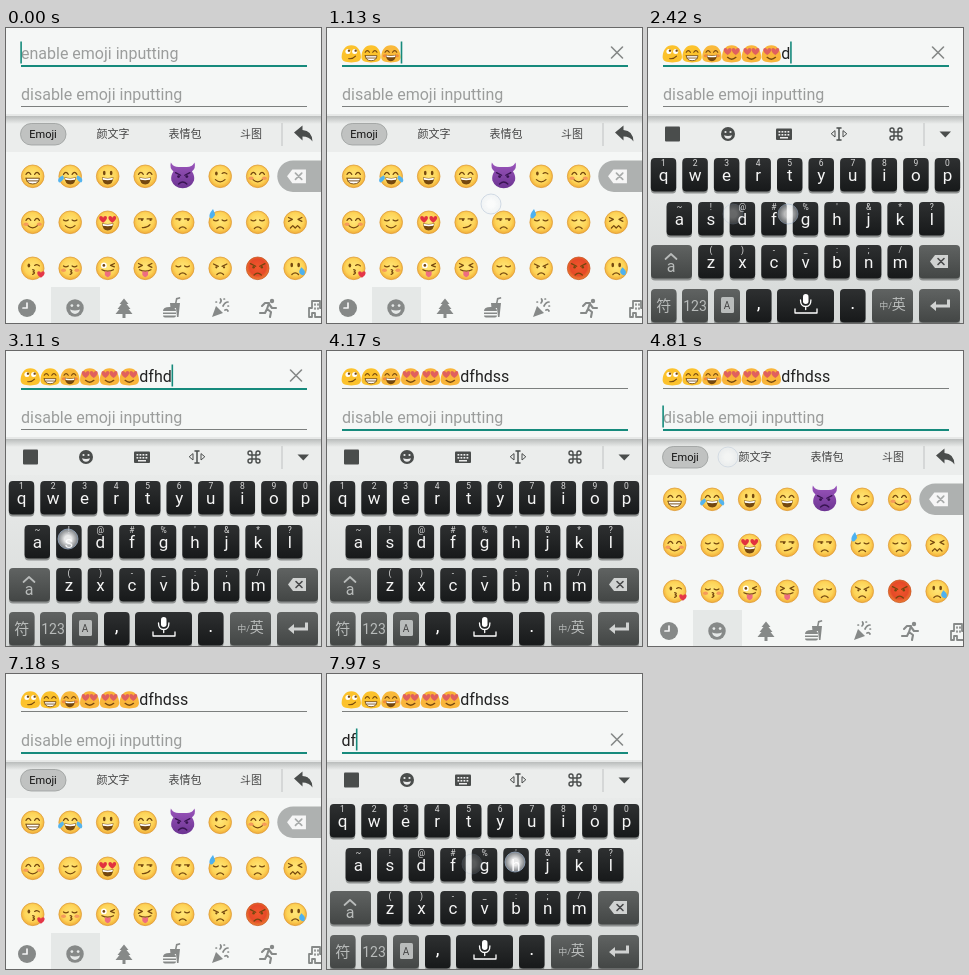
An HTML page that plays this animation: 315x295 px, repeating every 8 s.

```html
<!DOCTYPE html>
<html lang="en">
<head>
<meta charset="utf-8">
<title>Emoji input</title>
<style>
html, body { margin: 0; width: 100%; height: 100%; overflow: hidden; background: #f5f7f6; }
svg { display: block; width: 315px; height: 295px; }
text { font-family: Roboto, "Noto Sans CJK SC", "Noto Sans CJK", sans-serif; }
.field { font-size: 16px; fill: #222; }
.hint { font-size: 16px; fill: #9b9d9c; }
.mid { text-anchor: middle; }
</style>
</head>
<body>
<svg id="stage" viewBox="0 0 315 295" xmlns="http://www.w3.org/2000/svg"></svg>
<script>
const LOOP = 8000, TEAL = '#168a7c', BROWN = '#74480f', ICON = '#4a4d4c', TAB = '#868988';

// Shape helpers
const line = (d, c = BROWN, w = 1.3) =>
  `<path d="${d}" fill="none" stroke="${c}" stroke-width="${w}" stroke-linecap="round" stroke-linejoin="round"/>`;
const fill = (d, c) => `<path d="${d}" fill="${c}"/>`;
const oval = (x, y, rx, ry = rx, c = BROWN) => `<ellipse cx="${x}" cy="${y}" rx="${rx}" ry="${ry}" fill="${c}"/>`;
const rect = (x, y, w, h, c, r = 0, more = '') =>
  `<rect x="${x}" y="${y}" width="${w}" height="${h}" rx="${r}" fill="${c}" ${more}/>`;
const at = (x, y, s, k = 1) => `<g transform="translate(${x} ${y}) scale(${k})">${s}</g>`;
const word = (x, y, s, size, c) => `<text class="mid" x="${x}" y="${y}" font-size="${size}" fill="${c}">${s}</text>`;
const stops = list => list.map(([o, c]) => `<stop offset="${o}" stop-color="${c}"/>`).join('');
const gradient = (id, a, b) => `<linearGradient id="${id}" x2="0" y2="1">${stops([[0, a], [1, b]])}</linearGradient>`;
const glow = (id, a, b, c) => `<radialGradient id="${id}" cy=".45" r=".56">${stops([[0, a], [.65, b], [1, c]])}</radialGradient>`;

// Face parts, drawn around 0,0 with a radius of 11
const heart = 'M0 4C-6 0-5-4-2.5-4Q-.5-4 0-2Q.5-4 2.5-4C5-4 6 0 0 4';
const hearts = (c, k) => at(-4.800, -3, fill(heart, c), k) + at(4.800, -3, fill(heart, c), k);
const tears = fill('M-7-1q-6 3-4.500 6t5.500-3zM7-1q6 3 4.500 6t-5.500-3z', '#54b4ee');
const blushed = c => oval(-7, 2, 2.6, 1.8, c) + oval(7, 2, 2.6, 1.8, c);
const blush = blushed('#f59a5a');
const dots = oval(-3.600, -3.500, 1.4, 2.4) + oval(3.600, -3.500, 1.4, 2.4);
const happy = line('M-7-2q2.500-4 5 0M2-2q2.500-4 5 0');
const shut = line('M-7-2.500q2.500 2 5 0M2-2.500q2.500 2 5 0');
const aside = line('M-7-3.500h5M2-3.500h5') + oval(-3.4, -2.5, 1.2) + oval(5.6, -2.5, 1.2);
const squint = line('M-7-5l4 2-4 2M7-5l-4 2 4 2');
const wink = oval(-4, -3, 1.4, 2.1) + line('M2-3q2.500-2 5 .5');
const goofy = oval(-4, -3, 3, 3, '#fff') + oval(-4, -3, 1.4) + line('M7-5l-4 2 4 1.500');
const cross = line('M-7-4.500l5 2.500M7-4.500l-5 2.500') + oval(-4, -1, 1.2) + oval(4, -1, 1.2);
const sly = oval(-4, -3, 3, 3, '#fff') + oval(4, -3, 3, 3, '#fff') + oval(-2.800, -4, 1.4) + oval(5.200, -4, 1.4);
const smile = line('M-5 3.500q5 4.500 10 0');
const frown = line('M-3.500 6.500q3.500-3.500 7 0');
const smirk = line('M-3 5.500q5 .5 8-3');
const kiss = line('M0 1.5q3 .5 .5 2.2q3 1-.5 2.7');
const wave = line('M-5 6l2.5-2.5 2.5 2.5 2.5-2.5 2.5 2.5');
const grin = fill('M-7 2h14q-.5 6-7 6t-7-6', '#fff') + line('M-7 2h14q-.5 6-7 6t-7-6M-6 4.8h12', BROWN, 1);
const open = fill('M-6 1q6 1.500 12 0q-.5 7.500-6 7.500t-6-7.500', BROWN) + fill('M-5.500 1.500q5.500 1.500 11 0l-.5 2q-5 1-10 0z', '#fff');
const tongue = line('M-6 1.500q6 3 12 0') + fill('M-3 3q3 1 6 0v4q-3 4.500-6 0z', '#ee6d80');
const sweat = fill('M-7-13q-5 6-3 8.500t5-2.500q0-2-2-6', '#4db1f0');
const tear = fill('M6-1q-4 5-.5 7t4-2q0-2-3.500-5', '#4db1f0');

const ball = (id, edge) => `<circle r="11" fill="url(#${id})" stroke="${edge}" stroke-width=".7"/>`;
const face = (s, extra = '') => ball('sun', '#dc9a35') + at(0, 0, s, .93) + extra;
const blob = (s, c = '#fcc22c') => fill('M0-10.500C7-10.500 11-5 11.500 3C12 8.500 7 10 0 10S-12 8.500-11.500 3C-11-5-7-10.500 0-10.500', c) + s;
const EVIL = '#381451';
const imp = fill('M-9-5Q-13-8-11.500-13.500Q-9-9-4-9H4Q9-9 11.500-13.500Q13-8 9-5Q12 0 11 4Q8 11.500 0 11.500T-11 4Q-12 0-9-5', 'url(#violet)') +
  line('M-7-3.500l5 2.500M7-3.500l-5 2.500', EVIL) + oval(-4, .3, 1.4, 1.4, EVIL) + oval(4, .3, 1.4, 1.4, EVIL) + line('M-4 7.500q4-4 8 0', EVIL);

const faces = [
  [face(happy + grin), face(happy + open, tears), face(dots + open), face(happy + open), imp, face(wink + smile), face(happy + smile + blush)],
  [face(happy + smile + blush), face(shut + smile), face(hearts('#e2323f', .9) + open), face(aside + smirk), face(aside + frown),
    face(shut + frown, sweat), face(shut + frown), face(squint + wave)],
  [face(wink + kiss, at(8, 6, fill(heart, '#e43748'), .8)), face(shut + kiss + blush), face(goofy + tongue), face(squint + tongue),
    face(shut + frown), face(cross + frown), ball('rage', '#c6531f') + cross + frown, face(dots + frown, tear)]
];
const colX = c => 27 + 37.5 * c, rowY = r => 148 + 46 * r;

const adore = blob(hearts('#e0605e', 1.05) + line('M-5 4q5 4.500 10 0', BROWN, 1.6), '#f9b53a');
const typed = [blob(sly + smirk), blob(happy + grin), blob(happy + blushed('#f08a3c') + open, '#f9b93a'), adore, adore, adore];

// Taps: time, x, y, what they enter ('+' is an emoji)
const taps = [
  [120, 139, 190, '+'], [390, 139, 148, '+'], [670, 252, 150, '+'], [940, 164, 176],
  [1190, 102, 192, '+'], [1370, 102, 192, '+'], [1550, 102, 192, '+'], [1770, 297, 106],
  [2180, 85, 186, 'd'], [2360, 140, 186, 'f'], [2590, 188, 188, 'h'], [2800, 86, 187, 'd'],
  [3020, 62, 188, 's'], [3250, 62, 188, 's'], [3740, 160, 66], [4590, 80, 106],
  [5000, 64, 148], [5290, 139, 150], [5590, 177, 185], [5860, 102, 192], [6130, 64, 192],
  [6380, 139, 190], [6630, 214, 194], [7185, 297, 106],
  [7530, 85, 186, 'd'], [7720, 145, 190, 'f'], [7880, 188, 188, 'h']
];
const FOCUS = 3860, DELAY = 120;
const onPanel = t => t < 1960 || (t >= 4790 && t < 7300);

// Fields
const cross12 = y => line(`M284.500 ${y - 5.500}l11 11m0-11l-11 11`, '#858887', 1.6);
function fieldMarkup(i, hint) {
  const y = 41 * i;
  return `<g id="field${i}"><text class="hint" x="15" y="${31 + y}">${hint}</text>` +
    `<g class="faces">${i ? '' : typed.map((s, n) => at(24.3 + 19.8 * n, 26, s, .84)).join('')}</g>` +
    `<text class="field" y="${31 + y}"></text><g class="clear">${cross12(24.5 + y)}</g>` +
    rect(15, 37 + y, 286, 1, '#7c7f7e', 0, 'class="rule"') +
    rect(15, 13.5 + y, 1.6, 22, TEAL, 0, 'class="caret"') + '</g>';
}

// Keyboard
function key(x, y, w, body, dark = true) {
  return rect(x, y + 1.5, w, 34, '#8d908f', 4) + rect(x, y, w, 33.5, dark ? 'url(#key)' : 'url(#func)', 4) + body;
}
function letters(row, marks, first, y) {
  return [...row].map((ch, i) => {
    const x = first + 31.55 * i;
    return key(x - 12.7, y, 25.4, word(x, y + 23, ch, 17, '#f5f5f5') +
      word(x, y + 8, marks[i].replace('&', '&amp;'), 8.5, '#dcdcdc'));
  }).join('');
}
const smiley = (c, hole) => oval(0, 0, 7, 7, c) + oval(-2.5, -2, 1.1, 1.1, hole) + oval(2.5, -2, 1.1, 1.1, hole) +
  fill('M-4 1.200q4 1.500 8 0q-1 3.500-4 3.500t-4-3.500', hole);
const eraser = (c, x) => fill('M-9 0l5-6.500h13v13h-13z', c) + line('M-1-3l6 6m0-6l-6 6', x, 1.6);

const toolbar = rect(0, 86, 315, 2, '#e6e8e7') + rect(0, 88, 315, 36, '#ebedec') + rect(0, 88, 315, 8, 'url(#shade)') +
  rect(275.5, 95, 1, 23, '#bfc2c1');
const tools = rect(17, 98.500, 15, 15, ICON, 1) + at(80, 106, smiley(ICON, '#e9eaea')) +
  at(136, 106, rect(-8, -5.500, 16, 11.500, ICON, 1) +
    [-3, 0].map(y => [-6, -3, 0, 3].map(x => rect(x + .5, y, 1.8, 1.6, '#eee')).join('')).join('') + rect(-4, 3, 8, 1.5, '#eee')) +
  at(191, 106, line('M0-5v10M-2-6h4M-2 6h4', ICON, 1.5) + line('M-4-3v6l-3.500-3zM4-3v6l3.500-3z', ICON, 1)) +
  at(248, 106, line('M-2-2v-2a2 2 0 1 0-2 2h8a2 2 0 1 0-2-2v8a2 2 0 1 0 2-2h-8a2 2 0 1 0 2 2z', ICON, 1.4)) +
  fill('M291.500 103.500h11.500l-5.700 6z', ICON);
const PALE = '#b9bcbb';
const keyboard = rect(0, 123, 315, 172, 'url(#board)') + toolbar + tools +
  letters('qwertyuiop', '1234567890', 15.5, 130) +
  letters('asdfghjkl', "~!@#%'&*?", 31.3, 174) +
  letters('zxcvbnm', '()-_:;/', 62.9, 217) +
  key(3, 217, 41, word(23, 244, 'a', 16, PALE) + line('M17.500 231l5.500-5 5.500 5', PALE, 1.7), false) +
  key(271, 217, 41, at(291, 233.5, eraser('#d0d2d1', '#48494a')), false) +
  key(3, 261, 25.500, word(15.700, 283, '符', 15, PALE), false) +
  key(34, 261, 26, word(47, 282.5, '123', 14, PALE), false) +
  key(66, 261, 26, rect(73, 269, 13, 16, PALE, 1.500) + word(79, 281, 'A', 10, '#444'), false) +
  key(98, 261, 25.500, word(110.700, 281, ',', 19, '#fff')) +
  key(129, 261, 57, rect(155, 266, 5.500, 10, '#fff', 2.700) + line('M152.500 272q0 6.500 5.200 6.500t5.200-6.500M157.700 279v2.500', '#fff', 1.3) +
    line('M147 281v4h22v-4', '#fff', 1.3)) +
  key(192, 261, 25.500, word(204.700, 281, '.', 19, '#fff')) +
  key(224, 261, 41, word(244.500, 281, '<tspan font-size="9">中/</tspan>英', 14, PALE), false) +
  key(271, 261, 41, fill('M282 278l6-5v3.500h11v-5h3v8h-14v3.500z', '#d0d2d1'), false);

// Emoji panel
const tabs = at(21, 280, oval(0, 0, 9, 9, TAB) + line('M0-5v5h-4', '#f4f4f4', 1.7)) +
  rect(45, 259, 49, 36, '#e5e8e7') + at(69, 280, smiley(TAB, '#e5e8e7'), 1.25) +
  at(118, 280, fill('M0-9.500l4.500 5.500h-2l4 5h-2l4 5h-7v4h-3v-4h-7l4-5h-2l4-5h-2z', TAB)) +
  at(166, 280, fill('M-9 3q0-4 6.500-4t6.500 4zM-9 4.500h13v1.500h-13zM-9 7.500h13q0 2-2 2h-9q-2 0-2-2M-2-5h10l-1.500 14h-1.500l-1-9h-5.500zM3-5l1-5 4-1 .3 1.500-3 1-.7 3.500z', TAB)) +
  at(214, 280, fill('M-8 9l4-11 7 7z', TAB) + line('M0-5q2-2 .5-4M3-2q2-4 5-4M5 2q2-1 3 1M4-9l.5 0M-4-6l.5 0M8-2l.5 0', TAB, 1.7)) +
  at(262, 280, oval(4, -7, 2.200, 2.200, TAB) + line('M-6-2l3-3h4l-2 6 4 3-1 5M-1 1l-2 4h-5M1-4l3 4h4', TAB, 2.100)) +
  at(309, 280, line('M-6 9v-9h3v-7h8v7h3M-6 9h3v-4h3v4h6', TAB, 1.8) + line('M0-4v1M3-4v1M0 0v1M3 0v1', TAB, 1.7));
const pills = rect(14.5, 95.5, 45.5, 21.5, '#c0c2c1', 10.7, 'stroke="#9a9d9c" stroke-width=".8"') + word(37, 110.3, 'Emoji', 11, '#111') +
  word(107, 110.3, '颜文字', 11, '#444') + word(179, 110.3, '表情包', 11, '#444') + word(245, 110.3, '斗图', 11, '#444') +
  fill('M288 104.500l8.500-7v4.500q9.500.5 10 11.500q-3.500-5-10-5v4z', ICON);
const cells = taps.filter(p => p[2] > 125).map(([s, x, y]) => {
  const c = Math.round((x - 27) / 37.5), r = Math.round((y - 148) / 46);
  return rect(colX(c) - 18, rowY(r) - 18, 36, 36, '#dfe2e1', 0, `class="cell" data-s="${s}"`);
}).join('');
const panel = rect(0, 123, 315, 172, '#f5f7f6') + toolbar + pills + cells +
  faces.map((row, r) => row.map((s, c) => at(colX(c) - .3, rowY(r) + .3, s, 1.03)).join('')).join('') +
  fill('M315 132.500h-28a15.700 15.700 0 0 0 0 31.400h28z', '#aeb1b0') + at(290.5, 148.3, eraser('#f6f6f6', '#a8abaa'), 1.05) + tabs;

const stage = document.getElementById('stage');
stage.innerHTML = '<defs>' + glow('sun', '#ffe677', '#fdd357', '#f0a935') + glow('rage', '#f2572c', '#e54a28', '#ee8434') +
  gradient('violet', '#9a55bb', '#6c3492') + gradient('key', '#2e3031', '#17191a') + gradient('func', '#606362', '#434645') +
  gradient('shade', '#b9bcbb', '#ebedec') + gradient('board', '#e9ebea', '#d5d8d7') +
  '<radialGradient id="touch"><stop offset=".35" stop-color="#fff" stop-opacity=".9"/><stop offset="1" stop-color="#e9edf2" stop-opacity=".45"/></radialGradient></defs>' +
  rect(0, 0, 315, 295, '#f5f7f6') + fieldMarkup(0, 'enable emoji inputting') + fieldMarkup(1, 'disable emoji inputting') +
  `<g id="panel">${panel}</g><g id="keyboard">${keyboard}</g>` +
  taps.map(([, x, y]) => `<circle class="touch" cx="${x}" cy="${y}" r="10" fill="url(#touch)" stroke="#9fb2cc" stroke-opacity=".7"/>`).join('');

const all = (q, root = stage) => [...root.querySelectorAll(q)];
const show = (el, on) => el.setAttribute('visibility', on ? 'visible' : 'hidden');
const clamp = v => Math.max(0, Math.min(1, v));
const panelEl = stage.querySelector('#panel'), boardEl = stage.querySelector('#keyboard');
const touches = all('.touch'), cellEls = all('.cell');
const fields = [0, 1].map(i => {
  const root = stage.querySelector('#field' + i), get = q => root.querySelector(q);
  return { hint: get('.hint'), faces: [...get('.faces').children], text: get('.field'),
    clear: get('.clear'), rule: get('.rule'), caret: get('.caret') };
});

function drawField(f, input, active, blink) {
  const count = input.filter(ch => ch === '+').length;
  const str = input.filter(ch => ch !== '+').join('');
  const x = 15 + 19.8 * count;
  f.faces.forEach((el, i) => show(el, i < count));
  show(f.hint, !input.length);
  f.text.setAttribute('x', x - .5);
  if (f.text.textContent !== str) f.text.textContent = str;
  show(f.clear, active && input.length);
  f.rule.setAttribute('fill', active ? TEAL : '#7c7f7e');
  f.rule.setAttribute('height', active ? 2 : 1);
  show(f.caret, active && blink);
  f.caret.setAttribute('x', x - .7 + (str ? f.text.getComputedTextLength() : 0));
}

function draw(t) {
  const input = (from, to) => taps.filter(p => p[3] && p[0] >= from && p[0] < to && p[0] + DELAY <= t).map(p => p[3]);
  const second = t >= FOCUS;
  const blink = t < FOCUS || t >= 7500 || (t - 3640) % 1000 < 530;
  drawField(fields[0], input(0, FOCUS), !second, blink);
  drawField(fields[1], input(FOCUS, LOOP), second, blink);
  const emoji = onPanel(t);
  panelEl.style.display = emoji ? '' : 'none';
  boardEl.style.display = emoji ? 'none' : '';
  touches.forEach((el, i) => {
    const age = t - taps[i][0];
    el.setAttribute('opacity', age < 0 ? 0 : clamp(age / 80) * clamp((300 - age) / 180));
  });
  cellEls.forEach(el => {
    const age = t - el.dataset.s;
    el.style.display = age >= 20 && age < 150 ? '' : 'none';
  });
}

function tick() {
  draw(performance.now() % LOOP);
  requestAnimationFrame(tick);
}
tick();
</script>
</body>
</html>
```
